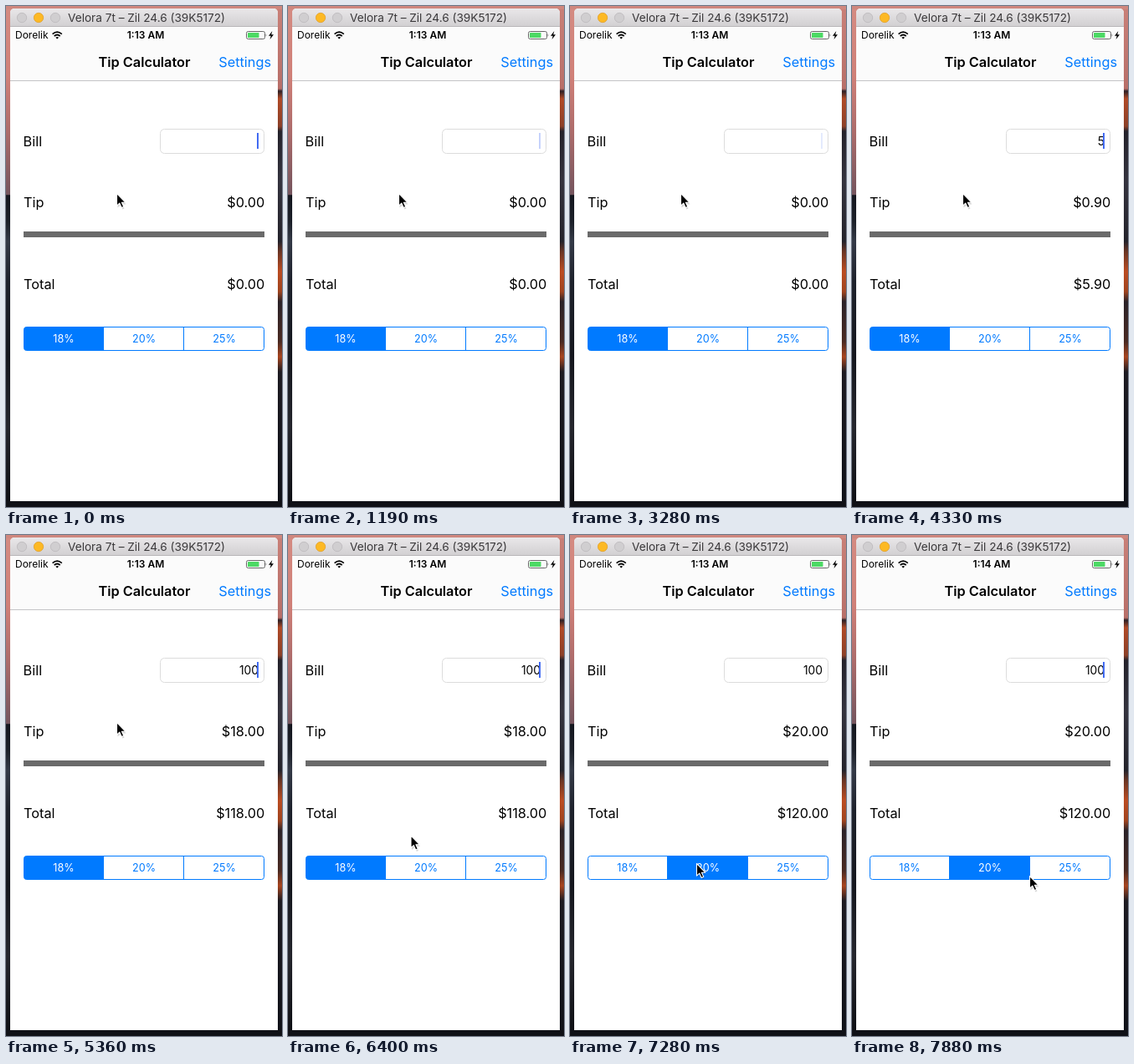
Write an HTML page that moves like this. It is 330 by 600 pixels and loops after 8000 ms.

```html
<!DOCTYPE html>
<html lang="en">
<head>
<meta charset="utf-8">
<title>Tip Calculator</title>
<style>
  html, body { margin: 0; width: 100%; height: 100%; overflow: hidden; }
  svg { display: block; width: 330px; height: 600px; font-family: Inter, Roboto, sans-serif; }
  .label { font-size: 16.3px; }
  .small { font-size: 12.6px; text-anchor: middle; }
  .end { text-anchor: end; }
  .mid { text-anchor: middle; }
</style>
</head>
<body>
<svg viewBox="0 0 330 600">
  <defs>
    <linearGradient id="left" x2="0" y2="1">
      <stop offset="0" stop-color="#d48b82"/>
      <stop offset=".14" stop-color="#d08078"/>
      <stop offset=".25" stop-color="#ad6c6b"/>
      <stop offset=".376" stop-color="#75555e"/>
      <stop offset=".378" stop-color="#15171f"/>
      <stop offset=".43" stop-color="#1c2029"/>
      <stop offset=".47" stop-color="#343a47"/>
      <stop offset=".55" stop-color="#1e222c"/>
      <stop offset=".7" stop-color="#15171e"/>
      <stop offset=".84" stop-color="#25262d"/>
      <stop offset="1" stop-color="#0d0e13"/>
    </linearGradient>
    <linearGradient id="right" x2="0" y2="1">
      <stop offset="0" stop-color="#c98078"/>
      <stop offset=".165" stop-color="#b86f69"/>
      <stop offset=".17" stop-color="#2c2025"/>
      <stop offset=".185" stop-color="#b04a27"/>
      <stop offset=".24" stop-color="#8c4028"/>
      <stop offset=".25" stop-color="#24222b"/>
      <stop offset=".35" stop-color="#34333e"/>
      <stop offset=".47" stop-color="#24232b"/>
      <stop offset=".49" stop-color="#6a3524"/>
      <stop offset=".53" stop-color="#bb4c22"/>
      <stop offset=".57" stop-color="#a0441f"/>
      <stop offset=".59" stop-color="#2a2228"/>
      <stop offset=".67" stop-color="#4a2a22"/>
      <stop offset=".7" stop-color="#a8451f"/>
      <stop offset=".73" stop-color="#1d1b22"/>
      <stop offset="1" stop-color="#0f1118"/>
    </linearGradient>
    <linearGradient id="bar" x2="0" y2="1">
      <stop offset="0" stop-color="#e9e7e9"/>
      <stop offset="1" stop-color="#d1cfd1"/>
    </linearGradient>
    <clipPath id="pill"><rect x="21.5" y="384.5" width="287" height="28" rx="3"/></clipPath>
  </defs>

  <!-- Desktop and window -->
  <rect width="165" height="600" fill="url(#left)"/>
  <rect x="165" width="165" height="600" fill="url(#right)"/>
  <rect width="330" height="4" fill="#cf877e"/>
  <rect y="593" width="330" height="7" fill="#101117"/>
  <path d="M5 593V8a5 5 0 0 1 5-5H320a5 5 0 0 1 5 5V593z" fill="#fff"/>
  <path d="M5 25V8a5 5 0 0 1 5-5H320a5 5 0 0 1 5 5V25z" fill="url(#bar)"/>
  <path d="M5 24.5H325" stroke="#b9b7b9"/>
  <g stroke-width=".8">
    <circle cx="19" cy="14" r="5.7" fill="#d0ced0" stroke="#bbb9bb"/>
    <circle cx="39" cy="14" r="5.7" fill="#fdb924" stroke="#e0a02c"/>
    <circle cx="59" cy="14" r="5.7" fill="#d0ced0" stroke="#bbb9bb"/>
  </g>
  <text class="mid" x="168" y="19" font-size="13.6" fill="#3a383a">Velora 7t – Zil 24.6 (39K5172)</text>

  <!-- Status and navigation bars -->
  <rect x="5" y="25" width="320" height="64" fill="#fbfbfb"/>
  <path d="M5 89.5H325" stroke="#c4c4c6"/>
  <text x="11" y="39" font-size="12">Dorelik</text>
  <g fill="none" stroke="#000" stroke-width="1.7">
    <path d="M55.6 33.6Q61.2 28.8 66.8 33.6M57.7 36Q61.2 33 64.7 36"/>
    <path d="M61.2 39.6L59.3 37.7Q61.2 36.2 63.1 37.7z" fill="#000" stroke="none"/>
  </g>
  <text id="clock" class="mid" x="167" y="39" font-size="12" font-weight="600"></text>
  <rect x="287.5" y="30.5" width="22" height="9" rx="2" fill="none" stroke="#666"/>
  <rect x="289" y="32" width="13.5" height="6" rx=".6" fill="#4cd964"/>
  <path d="M310.7 33.3q1.5 1.7 0 3.4z" fill="#555"/>
  <path d="M318.3 30L314 35.7H316.7L315.6 40L320 34.2H317.2z"/>
  <text class="mid" x="165.5" y="73" font-size="16.3" font-weight="600">Tip Calculator</text>
  <text class="label end" x="317" y="73" fill="#007aff">Settings</text>

  <!-- Form -->
  <g class="label">
    <text x="20.6" y="168">Bill</text>
    <text x="21" y="241">Tip</text>
    <text x="21" y="339">Total</text>
    <text id="tip" class="end" x="309.4" y="241"></text>
    <text id="total" class="end" x="309.4" y="339"></text>
  </g>
  <rect x="184.5" y="147.5" width="124" height="29" rx="5" fill="#fff" stroke="#dcdcdc"/>
  <text id="bill" class="end" x="302" y="166.5" font-size="13.8"></text>
  <rect id="caret" x="300" y="152" width="2" height="19" fill="#426bf2"/>
  <rect x="21" y="270" width="288" height="7" fill="#6a6a6a"/>

  <g clip-path="url(#pill)">
    <rect id="pressed" x="117" y="384" width="95" height="29" fill="#d6e9fd"/>
    <rect id="chosen" y="384" width="96" height="29" fill="#007aff"/>
  </g>
  <path d="M116.5 385V412M212.5 385V412" stroke="#007aff"/>
  <rect x="21.5" y="384.5" width="287" height="28" rx="3" fill="none" stroke="#007aff"/>
  <g class="small">
    <text id="seg0" x="69" y="403">18%</text>
    <text id="seg1" x="165" y="403">20%</text>
    <text id="seg2" x="261" y="403" fill="#007aff">25%</text>
  </g>

  <g id="pointer">
    <path d="M1 2V17L4.4 14L6.8 19L9 18L6.8 13H11z" fill="#000" opacity=".16"/>
    <path d="M0 0V14.6L3.3 11.6L5.7 17L8.2 15.9L5.9 10.7H10.3z" stroke="#fff" stroke-width="1.1" stroke-linejoin="round"/>
  </g>
</svg>
<script>
const LOOP = 8000, CLICK = 6990, RELEASE = 7130, NEW_MINUTE = 7430;

// Each track is a list of [start time, value], held until the next entry.
const bills = [
  [0, ""], [1640, "2"], [1940, "25"], [2540, "2"], [2690, ""], [3430, "5"],
  [3730, "50"], [4330, "5"], [4470, ""], [4920, "1"], [5220, "10"], [5360, "100"]
];
const caretAlpha = [
  [0, 1], [300, .3], [450, 0], [740, 1], [1190, .3], [1340, 0], [1640, 1],
  [3280, .14], [3430, 1], [5960, .14], [6110, 0], [6400, 1], [6990, .35],
  [7130, 0], [7430, 1]
];
const pointerSpots = [
  [0, [132.5, 224.5]], [6110, [134, 232]], [6260, [139, 285]], [6400, [147, 360]],
  [6550, [152, 410]], [6700, [153, 417]], [6840, [152, 400]], [6990, [151.5, 393.5]],
  [7430, [158, 396]], [7580, [180, 402]], [7730, [203, 407]], [7880, [212.5, 408.5]]
];

const el = id => document.getElementById(id);
const at = (track, t) => track.filter(([start]) => start <= t).pop()[1];
const money = n => "$" + n.toFixed(2);

function draw(t) {
  const bill = at(bills, t);
  const choice = t < RELEASE ? 0 : 1;
  const tip = bill * [.18, .2][choice];

  el("bill").textContent = bill;
  el("tip").textContent = money(tip);
  el("total").textContent = money(Number(bill) + tip);
  el("caret").setAttribute("opacity", at(caretAlpha, t));
  el("clock").textContent = t < NEW_MINUTE ? "1:13 AM" : "1:14 AM";

  el("chosen").setAttribute("x", 21 + 95.5 * choice);
  el("pressed").setAttribute("opacity", t >= CLICK && t < RELEASE ? 1 : 0);
  for (const i of [0, 1]) el("seg" + i).setAttribute("fill", i === choice ? "#fff" : "#007aff");
  el("pointer").setAttribute("transform", `translate(${at(pointerSpots, t)})`);
}

const start = performance.now();
function frame() {
  draw((performance.now() - start) % LOOP);
  requestAnimationFrame(frame);
}
frame();
</script>
</body>
</html>
```
